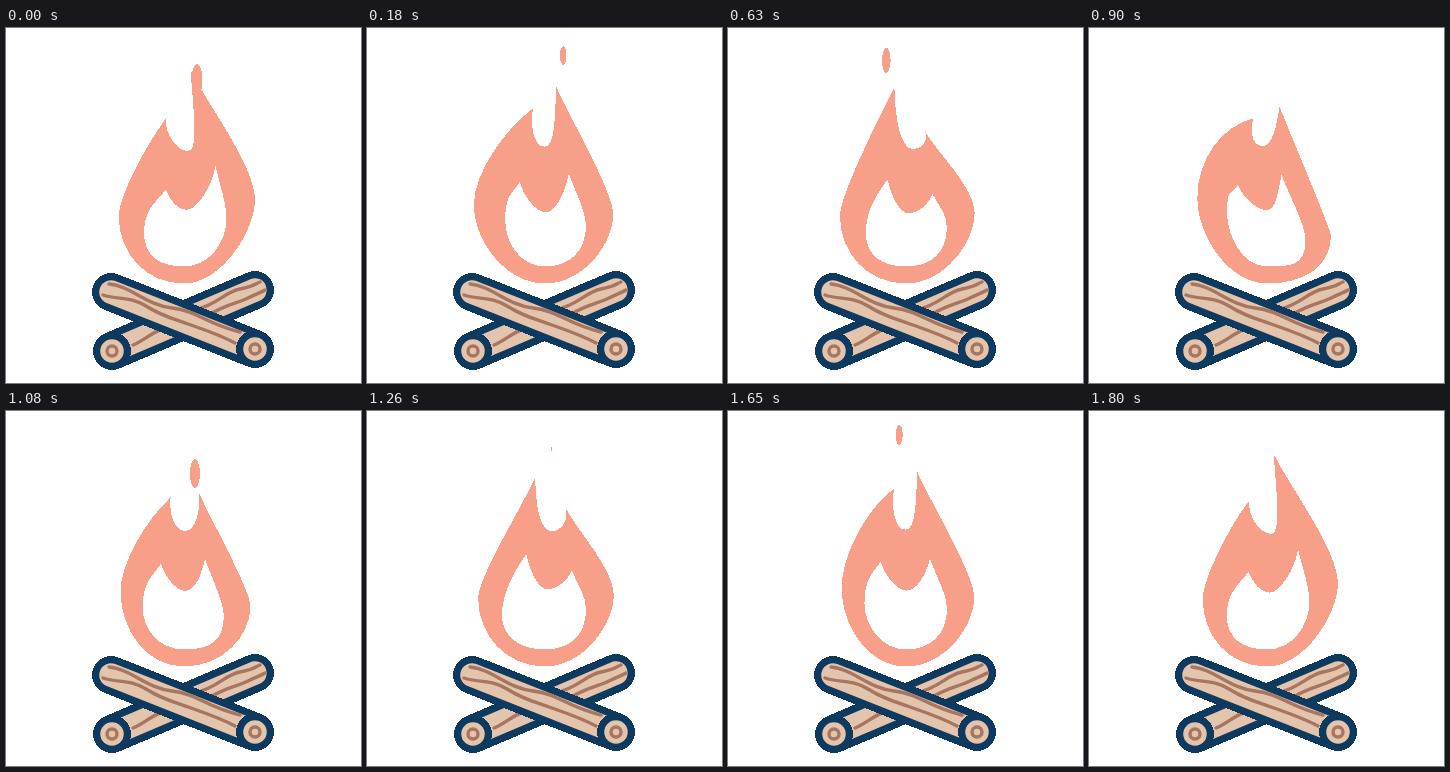
Write an HTML page that moves like this. It is 355 px wide and 355 px high and loops after 1830 ms.

```html
<!DOCTYPE html>
<html lang="en">
<head>
<meta charset="utf-8">
<title>Campfire</title>
<style>
html, body { margin: 0; height: 100%; overflow: hidden; background: #fff; }
svg { display: block; width: 100vw; height: 100vh; }
.bark { stroke: #0f3a60; stroke-width: 38; shape-rendering: crispEdges; }
.wood { stroke: #e3c4ac; stroke-width: 23.5; }
.grain { stroke: #a87660; stroke-width: 3.4; }
</style>
</head>
<body>
<svg viewBox="0 0 355 355">
  <g fill="#f79f89" shape-rendering="crispEdges">
    <path id="flame" fill-rule="evenodd"/>
    <g id="sparks"></g>
  </g>
  <g fill="none" stroke-linecap="round">
    <path class="bark" d="M106 323L249 262"/>
    <path class="wood" d="M106 323L249 262"/>
    <path class="grain" d="M188 282C212 277 218 264 234 261S248 256 254 254M206 285C222 276 232 275 242 270S254 265 259 262M127 317C140 312 146 303 164 298"/>
    <path class="bark" d="M106 323h0"/>
    <path class="wood" d="M106 323h0"/>
    <path class="bark" d="M105 264L249 321"/>
    <path class="wood" d="M105 264L249 321"/>
    <path class="grain" d="M97 267C112 272 124 268 140 278S165 290 182 296S212 306 229 315M103 256C125 258 140 277 166 280S200 296 234 304"/>
    <path class="bark" d="M249 321h0"/>
    <path class="wood" d="M249 321h0"/>
    <g class="grain">
      <circle cx="106" cy="323" r="5"/>
      <circle cx="249" cy="321" r="5"/>
    </g>
  </g>
</svg>
<script>
const LOOP = 1830, STEP = 30;
const SPARK = { span: 280, rise: 38, rx: 5.5, ry: 16 };

// Where and when each spark leaves a tip, and how far it drifts sideways
const births = [
  { start: 0, x: 191, y: 52, drift: 8 },
  { start: 500, x: 162, y: 50, drift: -8 },
  { start: 995, x: 191, y: 74, drift: -7 },
  { start: 1480, x: 170, y: 47, drift: 2 }
];

const flame = document.getElementById('flame');
const sparks = births.map(() => document.getElementById('sparks')
  .appendChild(document.createElementNS('http://www.w3.org/2000/svg', 'ellipse')));

const add = ([x, y], dx, dy) => [x + dx, y + dy];
const mix = (a, b, k) => a.map((p, i) => p + (b[i] - p) * k);
const trace = pts => 'M' + pts[0] + 'C' + pts.slice(1).join(' ') + 'Z';

// Every point swings on waves that fit one, two or three times in the loop
function flamePath(t) {
  const angle = 2 * Math.PI * t / LOOP;
  const slow = Math.cos(angle), drift = Math.sin(angle);
  const lick = Math.cos(2 * angle), lag = Math.sin(2 * angle) - drift;
  const flick = Math.cos(3 * angle), sway = Math.cos(3 * angle - 2.07);

  // Outer tips, notch and sides
  const L = [167 - 5 * lick - 2.5 * flick, 73 + 18 * lick + 4 * lag];
  const N = [179.5 + 4.5 * flick - 1.5 * lick, 119 + 2.5 * flick + 1.5 * lick];
  const R = [193.5 - 6 * lick - 3 * slow, 81 - 21 * lick - 18 * slow - 3 * lag];
  const S = [245.5 + 2 * flick + 1.5 * slow, 190 - 10 * flick - 8 * slow];
  const W = [110.8 - 4 * sway, 179 + 9 * flick];
  const depth = N[1] - L[1];

  // The same points of the hollow
  const l = [154.3 + 5.3 * flick, 150 + 9 * lick + 2.5 * flick + 3 * drift];
  const n = [179 + 1.5 * flick, 182 + 4 * drift];
  const r = [201 + 5.5 * flick + 3 * slow, 154 - 12 * lick - 4 * slow - 3 * lag];
  const s = [218.5 + flick + slow, 201 - 5 * flick - 6 * slow];
  const w = [137 + lick + 1.5 * drift, 195 + 10 * flick];

  return trace([
    L, add(L, (3.5 * flick - 3) * depth / 55, depth * (.42 + .08 * flick)), add(N, -12, 0),
    N, add(N, 10, 0), add(R, 3 * flick, (N[1] - R[1]) / 2),
    R, mix(R, S, .27), add(S, 0, -20 - 8 * flick - 6 * slow),
    S, add(S, 0, 30), [216, 255.5],
    [178, 255.5], [140, 255.5], add(W, 0, 38),
    W, add(W, 0, 10 * flick - 29), add(L, 6.5 * flick - 26, 26 + 9 * flick - 9 * lick), L
  ]) + trace([
    l, add(l, 4, (n[1] - l[1]) / 2), add(n, -9, 0),
    n, add(n, 10, 0), add(r, -4, (n[1] - r[1]) / 2),
    r, mix(r, s, .35), add(s, 0, -15),
    s, add(s, 0, 26), [202, 238.5],
    [178, 238.5], [153, 238.5], add(w, 0, 22),
    w, add(w, 0, -25), add(l, -8, 12), l
  ]);
}

function drawSpark(el, { start, x, y, drift }, t) {
  const u = (t - start) / SPARK.span;
  const size = u >= 0 && u < 1 ? 1 - u * u : 0;
  const attrs = {
    cx: x + drift * u, cy: y - SPARK.rise * u,
    rx: SPARK.rx * size, ry: SPARK.ry * size
  };
  for (const name in attrs) el.setAttribute(name, attrs[name]);
}

function draw() {
  const t = Math.floor(performance.now() % LOOP / STEP) * STEP;
  flame.setAttribute('d', flamePath(t));
  sparks.forEach((el, i) => drawSpark(el, births[i], t));
  requestAnimationFrame(draw);
}
draw();
</script>
</body>
</html>
```
